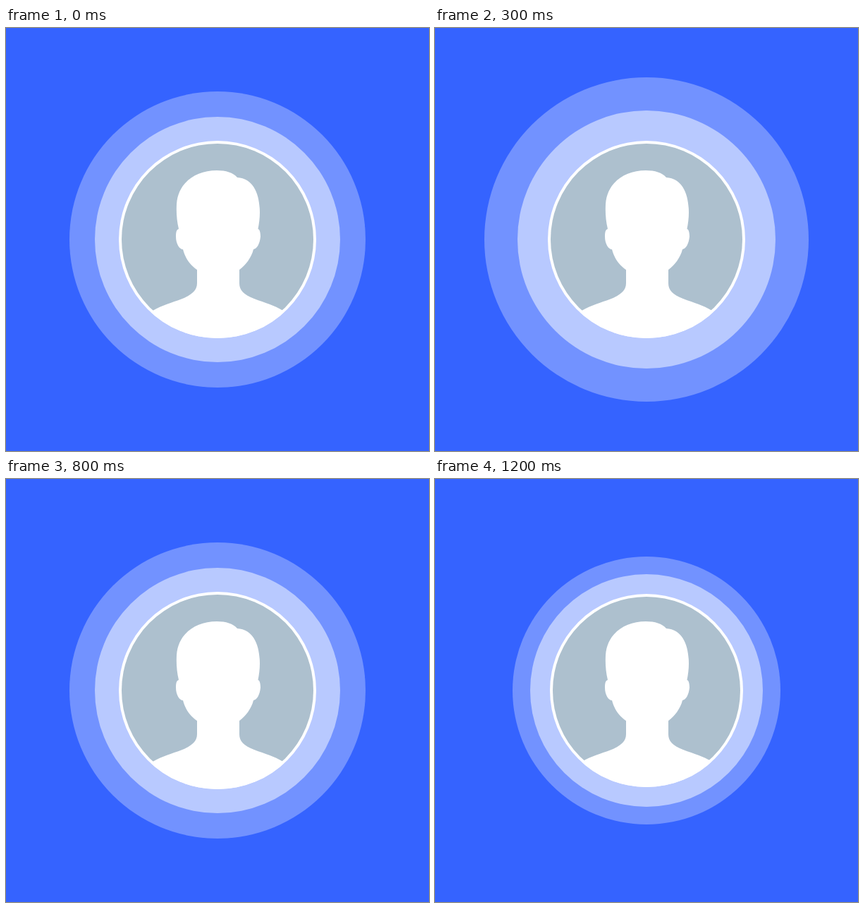
Recreate the animation shown at these times as an HTML page. Size 600 by 600 pixels, loop 1.3 s.

```html
<!DOCTYPE html>
<html lang="en">
<head>
<meta charset="utf-8">
<title>Pulsing avatar</title>
<style>
  html, body { margin: 0; width: 100%; height: 100%; overflow: hidden; background: #3563ff; }
  svg { display: block; width: 100vw; height: 100vh; }
</style>
</head>
<body>
<svg viewBox="0 0 600 600">
  <clipPath id="clip"><circle class="avatar" cx="300" cy="300" r="140"/></clipPath>
  <circle class="outer" cx="300" cy="300" r="210" fill="#7292ff"/>
  <circle class="middle" cx="300" cy="300" r="174" fill="#b8c9ff"/>
  <circle class="avatar" cx="300" cy="300" r="140" fill="#fff"/>
  <circle class="face" cx="300" cy="300" r="136" fill="#adc0ce"/>
  <path clip-path="url(#clip)" fill="#fff" d="M245 285C242 272 241.500 262 242 250C244 220 268 202 299 202
    C312 202 322 205 328 212C351 213 360 236 360 262C360 270 359 277 357.500 285
    C360 286 361 290 361 296C360 306 356 313 351 314C348 326 340 336 331 343V362
    C331 372 337 378 352 384C368 390 380 393 393 401L440 440H160L208 401
    C222 393 234 390 250 384C264 378 271 372 271 362V343C261 336 254 326 251 314
    C246 314 241 306 241 296C241 289 242 286 245 285Z"/>
</svg>
<script>
  const STEP = 100, STEPS = 13, PEAK = 4;

  function setRadius(name, r) {
    document.querySelectorAll('.' + name).forEach(el => el.setAttribute('r', r));
  }

  function draw(time) {
    const step = Math.floor(time / STEP) % STEPS;
    const fall = Math.abs(step - PEAK);
    // Shrinks 5px per step away from the peak, with one double step
    const outer = 235 - 5 * (fall < PEAK ? fall : fall + 1);
    const growth = outer - 190;
    const avatar = Math.min(140, Math.floor(137 + growth * 0.15));
    setRadius('outer', outer);
    setRadius('middle', Math.floor(165 + growth * 0.45));
    setRadius('avatar', avatar);
    setRadius('face', avatar - 4);
  }

  const origin = performance.now();
  function tick() {
    draw(performance.now() - origin);
    requestAnimationFrame(tick);
  }
  tick();
</script>
</body>
</html>
```
